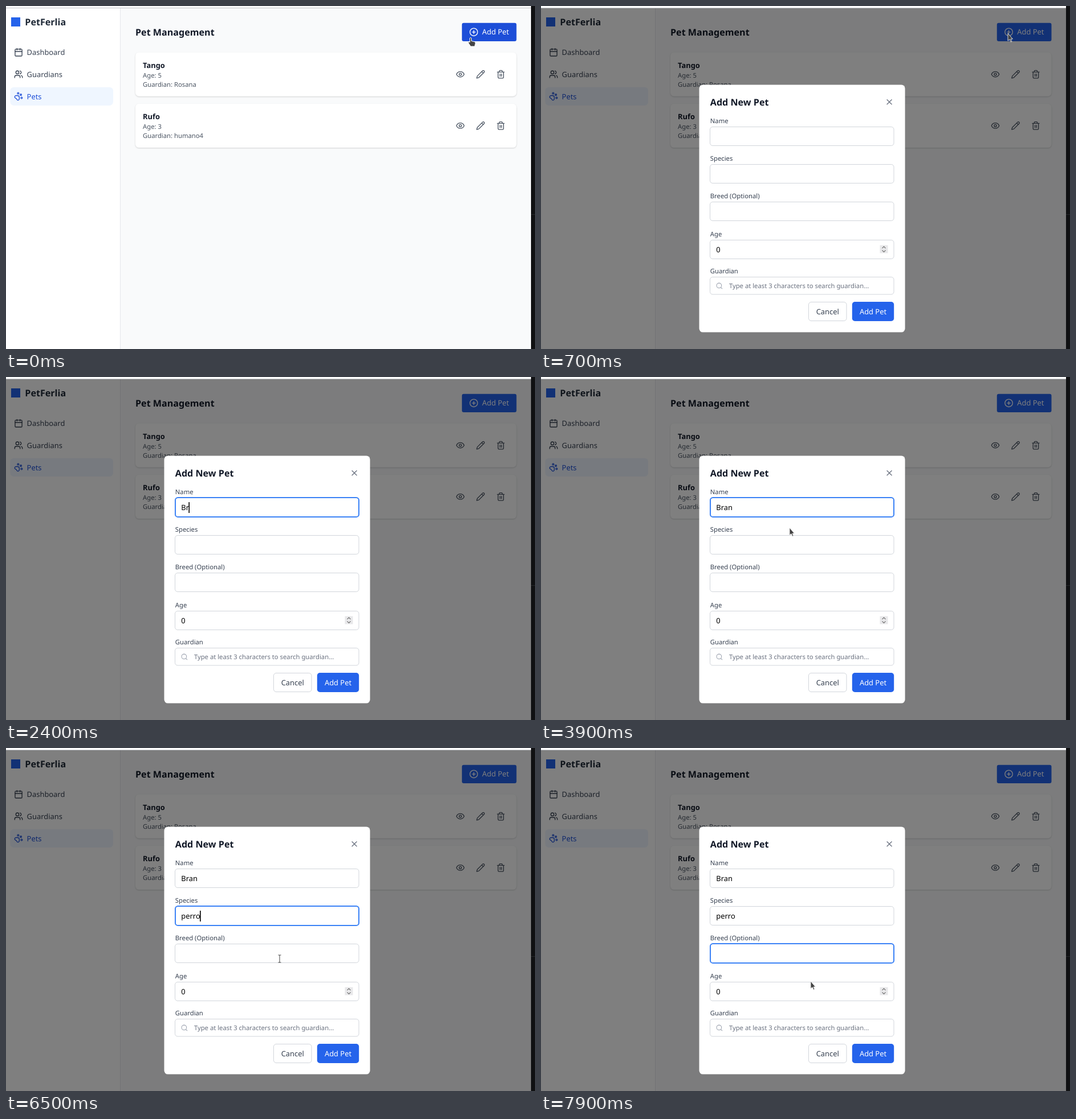
Animation of 928 by 603 pixels, one loop 8 s. Source, as an HTML page:

```html
<!DOCTYPE html>
<html lang="en">
<head>
<meta charset="utf-8">
<title>Pet Management</title>
<style>
  html, body { margin: 0; width: 100%; height: 100%; overflow: hidden; background: #f9fafb; }
  svg { display: block; width: 100%; height: 100%; }
  text { font-family: "Noto Sans", "Open Sans", sans-serif; white-space: pre; text-rendering: geometricPrecision; }
  .base { font-size: 12.9px; }
  .small { font-size: 11.28px; }
  .large { font-size: 16.12px; }
  .medium { font-weight: 500; }
  .semi { font-weight: 600; }
  .bold { font-weight: 700; }
  .icon { fill: none; stroke-width: 2; stroke-linecap: round; stroke-linejoin: round; }
  .card { fill: #fff; filter: drop-shadow(0 1px 1.2px rgba(0, 0, 0, .16)); }
  .field { fill: #fff; stroke: #d1d5db; }
</style>
</head>
<body>
<svg id="stage" viewBox="0 0 928 603" preserveAspectRatio="none"></svg>
<script>
const LOOP = 8000, STEP = 100;

const ICONS = {
  calendar: '<rect x="3" y="4" width="18" height="18" rx="2"/><path d="M16 2v4M8 2v4M3 10h18"/>',
  users: '<path d="M16 21v-2a4 4 0 0 0-4-4H6a4 4 0 0 0-4 4v2M22 21v-2a4 4 0 0 0-3-3.87M16 3.13a4 4 0 0 1 0 7.75"/><circle cx="9" cy="7" r="4"/>',
  paw: '<circle cx="11" cy="4" r="2"/><circle cx="18" cy="8" r="2"/><circle cx="20" cy="16" r="2"/><path d="M9 10a5 5 0 0 1 5 5v3.5a3.5 3.5 0 0 1-6.84 1.05Q6.52 17.48 4.46 16.84A3.5 3.5 0 0 1 5.5 10Z"/>',
  plus: '<circle cx="12" cy="12" r="10"/><path d="M8 12h8M12 8v8"/>',
  eye: '<path d="M2 12s3-7 10-7 10 7 10 7-3 7-10 7-10-7-10-7Z"/><circle cx="12" cy="12" r="3"/>',
  pencil: '<path d="M17 3a2.85 2.83 0 1 1 4 4L7.5 20.5 2 22l1.5-5.5ZM15 5l4 4"/>',
  trash: '<path d="M3 6h18M19 6v14c0 1-1 2-2 2H7c-1 0-2-1-2-2V6M8 6V4c0-1 1-2 2-2h4c1 0 2 1 2 2v2M10 11v6M14 11v6"/>',
  close: '<path d="M18 6 6 18M6 6l12 12"/>',
  search: '<circle cx="11" cy="11" r="8"/><path d="m21 21-4.3-4.3"/>'
};

const text = (x, y, cls, fill, str, extra = '') =>
  `<text x="${x}" y="${y}" class="${cls}" fill="${fill}" ${extra}>${str}</text>`;
const rect = (x, y, w, h, attrs) =>
  `<rect x="${x}" y="${y}" width="${w}" height="${h}" ${attrs}/>`;
const icon = (name, cx, cy, color, size = 16.12) =>
  `<g class="icon" stroke="${color}" transform="translate(${cx - size / 2} ${cy - size / 2}) scale(${size / 24})">${ICONS[name]}</g>`;

const navItem = (name, label, cy, color) =>
  icon(name, 22, cy, color) + text(36.6, Math.round(cy + 4.9), 'base', color, label);

const petCard = (top, name, age, guardian) =>
  rect(227, top, 668.5, 77.2, 'rx="6.4" class="card"') +
  text(240, Math.floor(top + 27.6), 'base semi', '#111827', name) +
  text(240, Math.floor(top + 44.7), 'small', '#4b5563', `Age: ${age}`) +
  text(240, Math.floor(top + 60.8), 'small', '#4b5563', `Guardian: ${guardian}`) +
  ['eye', 'pencil', 'trash'].map((n, i) => icon(n, 797 + 35.5 * i, top + 38.6, '#4b5563')).join('');

const FIELD_H = 34, FIELD_GAP = 66.1;
const fieldTop = i => Math.floor(212.7 + FIELD_GAP * i);
const fieldText = i => fieldTop(i) + 22;

const field = (label, i) =>
  text(296.8, fieldTop(i) - 6, 'small medium', '#374151', label) +
  rect(296.5, fieldTop(i) + .5, 322.5, FIELD_H - 1, 'rx="4.6" class="field"') +
  text(307.3, fieldText(i), 'base', '#000', '', `id="value${i}"`);

const page =
  rect(0, 0, 928, 603, 'fill="#f9fafb"') +
  rect(0, 0, 200, 603, 'fill="#fff"') +
  rect(200, 0, 1, 603, 'fill="#e5e7eb"') +
  rect(9, 20, 16, 16, 'fill="#2563eb"') +
  text(33.3, 34, 'large bold', '#1f2937', 'PetFerlia') +
  rect(7.4, 142.7, 180.6, 32.2, 'rx="6.4" fill="#eff6ff"') +
  navItem('calendar', 'Dashboard', 81.3, '#374151') +
  navItem('users', 'Guardians', 120, '#374151') +
  navItem('paw', 'Pets', 158.8, '#1d4ed8') +
  text(227, 52, 'large semi', '#111827', 'Pet Management') +
  rect(799.8, 29.7, 95.7, 32.3, 'rx="3.2" id="addButton"') +
  icon('plus', 820.6, 45.8, '#fff') +
  text(835.3, 50, 'base', '#fff', 'Add Pet') +
  petCard(81.5, 'Tango', 5, 'Rosana') +
  petCard(171.8, 'Rufo', 3, 'humano4');

const dialog =
  rect(0, 4, 921, 599, 'fill="#000" fill-opacity=".5"') +
  rect(277.5, 138.5, 361.1, 435, 'rx="6.4" fill="#fff"') +
  text(296.8, 175, 'large semi', '#111827', 'Add New Pet') +
  icon('close', 611.1, 168.8, '#6b7280') +
  ['Name', 'Species', 'Breed (Optional)', 'Age'].map(field).join('') +
  rect(594.5, 420.5, 14, 14, 'fill="#e8e8ea"') +
  '<path d="M598.5 425.8l3-3 3 3M598.5 429.4l3 3 3-3" fill="none" stroke="#6b6b6b" stroke-width="1.1"/>' +
  text(296.8, 470, 'small medium', '#374151', 'Guardian') +
  rect(296.5, 476.5, 322.5, 30.5, 'rx="4.6" class="field"') +
  icon('search', 312.9, 492, '#9ca3af', 12.9) +
  text(329.9, 496, 'small', '#6b7280', 'Type at least 3 characters to search guardian...') +
  rect(469.5, 520.5, 66.5, 33, 'rx="4.6" class="field"') +
  text(482.7, 542, 'base', '#374151', 'Cancel') +
  rect(545.8, 520, 73.4, 34, 'rx="4.8" fill="#2563eb"') +
  text(558.9, 542, 'base', '#fff', 'Add Pet') +
  rect(297, 0, 322, FIELD_H, 'rx="4.6" fill="none" stroke="#3b82f6" stroke-width="2" id="focusRing"') +
  rect(0, 0, 1.6, 19, 'id="caret"');

const frame =
  rect(0, 0, 921, 3, 'fill="#fff"') +
  rect(0, 3, 921, 1, 'fill="#c2c4c8"') +
  rect(921, 0, 7, 603, 'fill="#101113"') +
  rect(921, 366, 7, 1, 'fill="#25272a"');

const pointers = `<g id="pointer" stroke-linejoin="round">
  <path id="hand" d="M-1.5 1.5Q0-.5 1.5 1.5V6.5L7 7.8Q9 8.5 8.4 11L7.3 16H0L-4 9.6Q-4 7.6-2 8.2L-1.2 8.8Z" fill="#444" stroke="#fff"/>
  <path id="arrow" d="M0 0V13.2L3 10.6 5.2 15.2 7 14.3 5 10H8.5Z" fill="#444" stroke="#fff" stroke-width=".8"/>
  <path id="beam" d="M-2.6-6.5H-.8L0-5.8.8-6.5H2.6M0-5.8V5.8M-2.6 6.5H-.8L0 5.8.8 6.5H2.6" fill="none" stroke="#555" stroke-width="1.1"/>
</g>`;

document.getElementById('stage').innerHTML =
  page + `<g id="dialog">${dialog}</g>` + frame + pointers;

const el = id => document.getElementById(id);
const show = (id, on) => el(id).setAttribute('display', on ? 'inline' : 'none');
const place = (id, attrs) => Object.entries(attrs).forEach(([k, v]) => el(id).setAttribute(k, v));

const OPEN = 700;
const FOCUS = [1500, 4200, 6800];
const TYPING = [
  { word: 'Bran', keys: [2100, 2400, 2800, 3000] },
  { word: 'perro', keys: [5200, 5300, 5400, 5600, 5700] },
  { word: '', keys: [] }
];
const CARET_OFF = [[2000, 2100], [2600, 2800], [3700, 4200], [7400, 8000]];

// Each stretch of pointer travel: [time, x, y]; the pointer hides at "until".
const TRAVEL = [
  { until: 2100, path: [[200, 815, 55], [500, 819, 48], [700, 819, 48], [1400, 412, 222], [1500, 393, 231.5]] },
  { until: 5200, path: [[3500, 392.6, 231.5], [3600, 392.6, 231.5], [3800, 425, 256], [3900, 436, 265], [4000, 432, 284.5], [4200, 426, 284.5]] },
  { until: 7100, path: [[6200, 426, 283], [6300, 442, 306], [6400, 465, 342], [6500, 480, 370.5], [6800, 479.6, 355]] },
  { until: 8000, path: [[7400, 481, 357], [7500, 492, 366], [7600, 493, 383], [7700, 488, 396], [7900, 473, 410]] }
];

function pointerAt(t) {
  const trip = TRAVEL.find(p => t < p.until);
  const path = trip.path;
  if (t < path[0][0]) return trip === TRAVEL[0] ? path[0].slice(1) : null;
  const next = path.findIndex(p => p[0] > t);
  if (next < 0) return path[path.length - 1].slice(1);
  const [t0, x0, y0] = path[next - 1], [t1, x1, y1] = path[next];
  const k = (t - t0) / (t1 - t0);
  return [x0 + (x1 - x0) * k, y0 + (y1 - y0) * k];
}

function pointerKind(t, x, y) {
  if (t < OPEN) return 'hand';
  const overField = x > 297 && x < 619 &&
    [0, 1, 2, 3].some(i => y >= fieldTop(i) && y < fieldTop(i) + FIELD_H);
  return overField ? 'beam' : 'arrow';
}

function drawPointer(t) {
  const pos = pointerAt(t);
  show('pointer', pos);
  if (!pos) return;
  const kind = pointerKind(t, ...pos);
  ['hand', 'arrow', 'beam'].forEach(k => show(k, k === kind));
  place('pointer', { transform: `translate(${pos})` });
}

function drawForm(t) {
  show('dialog', t >= OPEN);
  place('addButton', { fill: t >= OPEN ? '#2563eb' : '#1d4ed8' });
  TYPING.forEach(({ word, keys }, i) => {
    el('value' + i).textContent = word.slice(0, keys.filter(k => t >= k).length);
  });
  const active = FOCUS.filter(f => t >= f).length - 1;
  const focused = active >= 0;
  show('focusRing', focused);
  show('caret', focused && !CARET_OFF.some(([a, b]) => t >= a && t < b));
  if (!focused) return;
  place('focusRing', { y: fieldTop(active) });
  const value = el('value' + active);
  const width = value.textContent ? value.getComputedTextLength() : 0;
  place('caret', { x: 307 + width - .3, y: fieldTop(active) + 8 });
}

el('value3').textContent = '0';

const start = performance.now();
function tick() {
  const now = (performance.now() - start) % LOOP;
  const t = Math.floor(now / STEP) * STEP;
  drawForm(t);
  drawPointer(t);
  requestAnimationFrame(tick);
}
tick();
</script>
</body>
</html>
```
